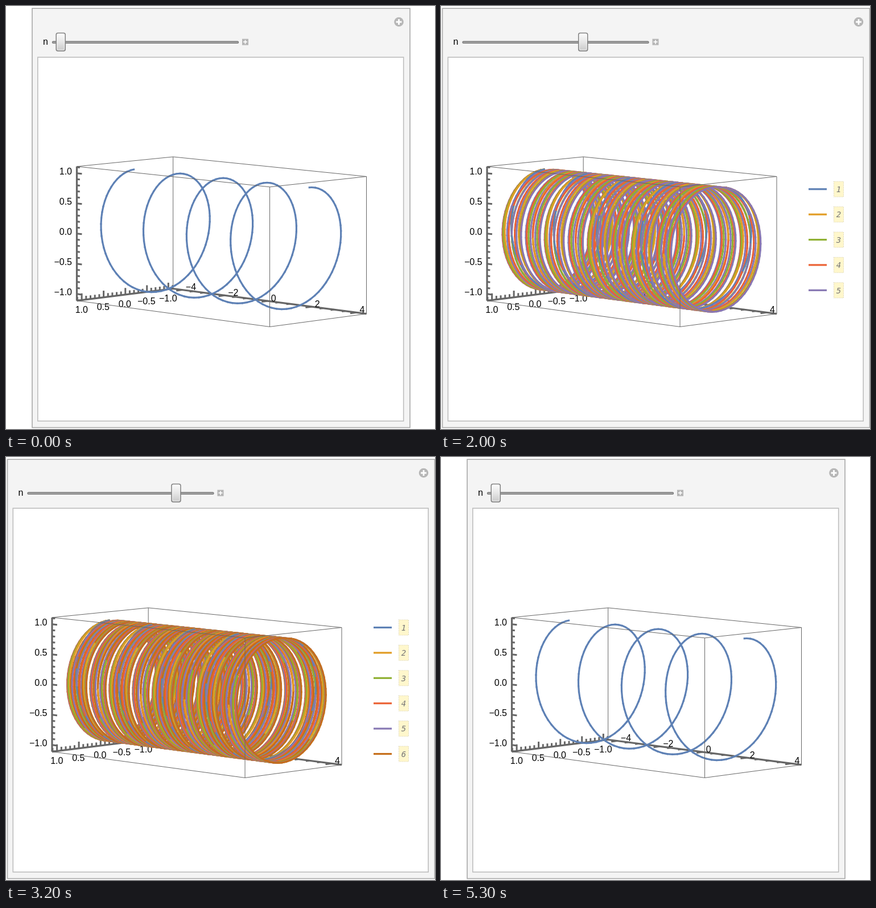
Recreate the animation shown at these times as an HTML page with a canvas. Size 754 px wide and 743 px high, loop 6 s.

```html
<!DOCTYPE html>
<html lang="en">
<head>
<meta charset="utf-8">
<title>Odd harmonic helices</title>
<style>
html, body { margin: 0; width: 100%; height: 100%; overflow: hidden; background: #fff; }
svg, canvas { position: absolute; left: 0; top: 0; width: 754px; height: 743px; }
text { font: 16px "Liberation Sans", Arial, sans-serif; fill: #000; }
.key { font: italic 14px "DejaVu Sans Mono", monospace; fill: #777; text-anchor: middle; }
</style>
</head>
<body>
<svg id="base" viewBox="0 0 754 743">
  <defs>
    <linearGradient id="knob" x1="0" y1="0" x2="0" y2="1">
      <stop offset="0" stop-color="#fdfdfd"/>
      <stop offset=".5" stop-color="#e6e6e6"/>
      <stop offset="1" stop-color="#c8c8c8"/>
    </linearGradient>
  </defs>
  <rect id="panel" y="4.2" height="736.3" fill="#f4f4f4" stroke="#a8a8a8" stroke-width="1.6"/>
  <rect id="view" y="90" height="639" fill="#fff" stroke="#bdbdbd" stroke-width="1.6"/>
  <g id="menu">
    <circle r="8.3" fill="#b6b6b6"/>
    <path d="M-5 0H5M0-5V5" stroke="#fff" stroke-width="2.8"/>
  </g>
  <g id="scene">
    <text x="21.5" y="68">n</text>
    <path d="M39.5 63.7H363.5" stroke="#787878" stroke-width="4.4" stroke-linecap="round"/>
    <path d="M39.5 63.9H363.5" stroke="#aaa" stroke-width="1.8" stroke-linecap="round"/>
    <rect x="371.5" y="57.7" width="11" height="11" fill="#b6b6b6"/>
    <path d="M373.5 63.2H380.5M377 59.7V66.7" stroke="#fff" stroke-width="1.7"/>
    <g id="thumb">
      <rect x="-8" y="47.5" width="16" height="31.5" rx="3" fill="url(#knob)" stroke="#808080" stroke-width="1.5"/>
      <rect x="-6.2" y="49.3" width="12.4" height="27.9" rx="2" fill="none" stroke="#fff" stroke-opacity=".6"/>
    </g>
  </g>
  <g id="legend"></g>
</svg>
<canvas id="curves" width="754" height="743"></canvas>
<svg viewBox="0 0 754 743"><g id="front"></g></svg>
<script>
const COLORS = ['#5e81b5', '#e19c24', '#8fb032', '#eb6235', '#8778b3', '#c56e1a', '#5d9ec7'];
const LOOP = 6000;
const UPS = [700, 1200, 1600, 2000, 2400, 2800];
const DOWNS = [3200, 3600, 4000, 4400, 4800, 5300];
const PAD = 0.9; // share of the box filled by the data

const $ = id => document.getElementById(id);
const ctx = $('curves').getContext('2d');

function add(parent, tag, attrs, text) {
  const el = document.createElementNS('http://www.w3.org/2000/svg', tag);
  for (const key in attrs) el.setAttribute(key, attrs[key]);
  if (text !== undefined) el.textContent = text;
  parent.appendChild(el);
  return el;
}

// Perspective view of the box [-1, 1]^3
const depth = (u, v) => 1 - 0.0204 * u + 0.009 * v;
function project(u, v, s) {
  const w = depth(u, v);
  return [
    (332.6 + 162.9 * u + 87.8 * v) / w,
    (409.8 + 11.7 * u - 6.2 * v - 119.2 * s) / w
  ];
}

function edges(parent, list, width) {
  const d = list.map(([a, b]) => 'M' + project(...a) + 'L' + project(...b)).join('');
  add(parent, 'path', { d, stroke: '#666', 'stroke-width': width, fill: 'none' });
}

function label(x, y, text, anchor) {
  add($('scene'), 'text', { x, y, 'text-anchor': anchor }, text.replace('-', '\u2212'));
}

function buildBox() {
  const scene = $('scene');
  edges(scene, [
    [[-1, 1, -1], [-1, 1, 1]], [[-1, -1, 1], [-1, 1, 1]],
    [[-1, 1, 1], [1, 1, 1]], [[1, 1, -1], [1, 1, 1]]
  ], 1);
  edges($('front'), [
    [[-1, -1, 1], [1, -1, 1]], [[1, -1, 1], [1, 1, 1]], [[1, -1, -1], [1, -1, 1]],
    [[-1, -1, -1], [1, -1, -1]], [[1, -1, -1], [1, 1, -1]]
  ], 1);
  edges(scene, [
    [[-1, -1, 1], [-1, -1, -1]], [[-1, -1, -1], [-1, 1, -1]], [[-1, 1, -1], [1, 1, -1]]
  ], 3.2);

  const ticks = [];
  for (let i = -11; i <= 11; i++) {
    const p = i / 10 * PAD, major = i % 5 === 0;
    ticks.push([[-1, -1, p], [major ? -0.945 : -0.967, -1, p]]);
    ticks.push([[-1, -p, -1], [-1, -p, major ? -0.9 : -0.945]]);
  }
  for (let i = -8; i <= 8; i++) {
    const p = i / 8 * PAD;
    ticks.push([[p, 1, -1], [p, i % 4 ? 0.93 : 0.87, -1]]);
  }
  edges(scene, ticks, 3);

  for (let i = 0; i < 5; i++) {
    const value = (1 - i / 2).toFixed(1);
    label(72.5, 295.7 + i * 53.1, value, 'end');
    label(89.3 + i * 38, 538.6 - i * 4.9, value, 'middle');
  }
  for (let x = -4; x <= 4; x += 2) {
    const [px, py] = project(x / 4 * PAD, 1, -1);
    label(px + (x < 0 ? 15 : 10), py + 0.6, String(x), 'middle');
  }
}

// Helix k: (t, sin mt, cos mt) with m = (2k + 1) pi, cut into short pieces
function buildPieces() {
  const pieces = [];
  COLORS.forEach((color, k) => {
    const m = 2 * k + 1, count = 4 * m * 64;
    const at = i => {
      const t = -4 + 8 * Math.min(i, count) / count, a = m * Math.PI * t;
      return [t / 4 * PAD, -PAD * Math.sin(a), PAD * Math.cos(a)];
    };
    for (let i = 0; i < count; i++) {
      const [u, v] = at(i + 0.5);
      pieces.push({ k, color, far: depth(u, v), a: project(...at(i)), b: project(...at(i + 1.2)) });
    }
  });
  return pieces.sort((p, q) => q.far - p.far || p.k - q.k);
}

function drawCurves(n, shift) {
  ctx.setTransform(1, 0, 0, 1, 0, 0);
  ctx.clearRect(0, 0, 754, 743);
  ctx.translate(shift, 0);
  ctx.lineWidth = 3.2;
  for (const p of pieces) {
    if (p.k >= n) continue;
    ctx.strokeStyle = p.color;
    ctx.beginPath();
    ctx.moveTo(...p.a);
    ctx.lineTo(...p.b);
    ctx.stroke();
  }
}

function drawLegend(n) {
  const legend = $('legend');
  legend.replaceChildren();
  if (n < 2) return;
  for (let k = 0; k < n; k++) {
    const y = 410.5 + (k - (n - 1) / 2) * 44.4;
    add(legend, 'path', { d: `M646 ${y}H678`, stroke: COLORS[k], 'stroke-width': 3.2 });
    add(legend, 'rect', {
      x: 690.5, y: y - 13.5, width: 17, height: 27,
      fill: '#fff7cc', stroke: '#c9c09a', 'stroke-dasharray': '1 2'
    });
    add(legend, 'text', { x: 699, y: y + 5.3, class: 'key' }, k + 1);
  }
}

function setFrame(id, left, right) {
  $(id).setAttribute('x', left);
  $(id).setAttribute('width', right - left);
}

function show(n) {
  const shift = n === 1 ? 43.5 : 0;
  const move = `translate(${shift} 0)`;
  setFrame('panel', 2.5 + shift, 753.5 - shift);
  setFrame('view', 12.3 + shift, 742.2 - shift);
  $('menu').setAttribute('transform', `translate(${734 - shift} 28)`);
  $('scene').setAttribute('transform', move);
  $('front').setAttribute('transform', move);
  $('thumb').setAttribute('transform', `translate(${52.7 + (n - 1) * 49.25} 0)`);
  drawLegend(n);
  drawCurves(n, shift);
}

let shown = 0;
function render(time) {
  const t = time % LOOP;
  const passed = list => list.filter(x => t >= x).length;
  const n = 1 + passed(UPS) - passed(DOWNS);
  if (n !== shown) show(shown = n);
}

buildBox();
const pieces = buildPieces();
const start = performance.now();
function tick() {
  render(performance.now() - start);
  requestAnimationFrame(tick);
}
tick();
</script>
</body>
</html>
```
